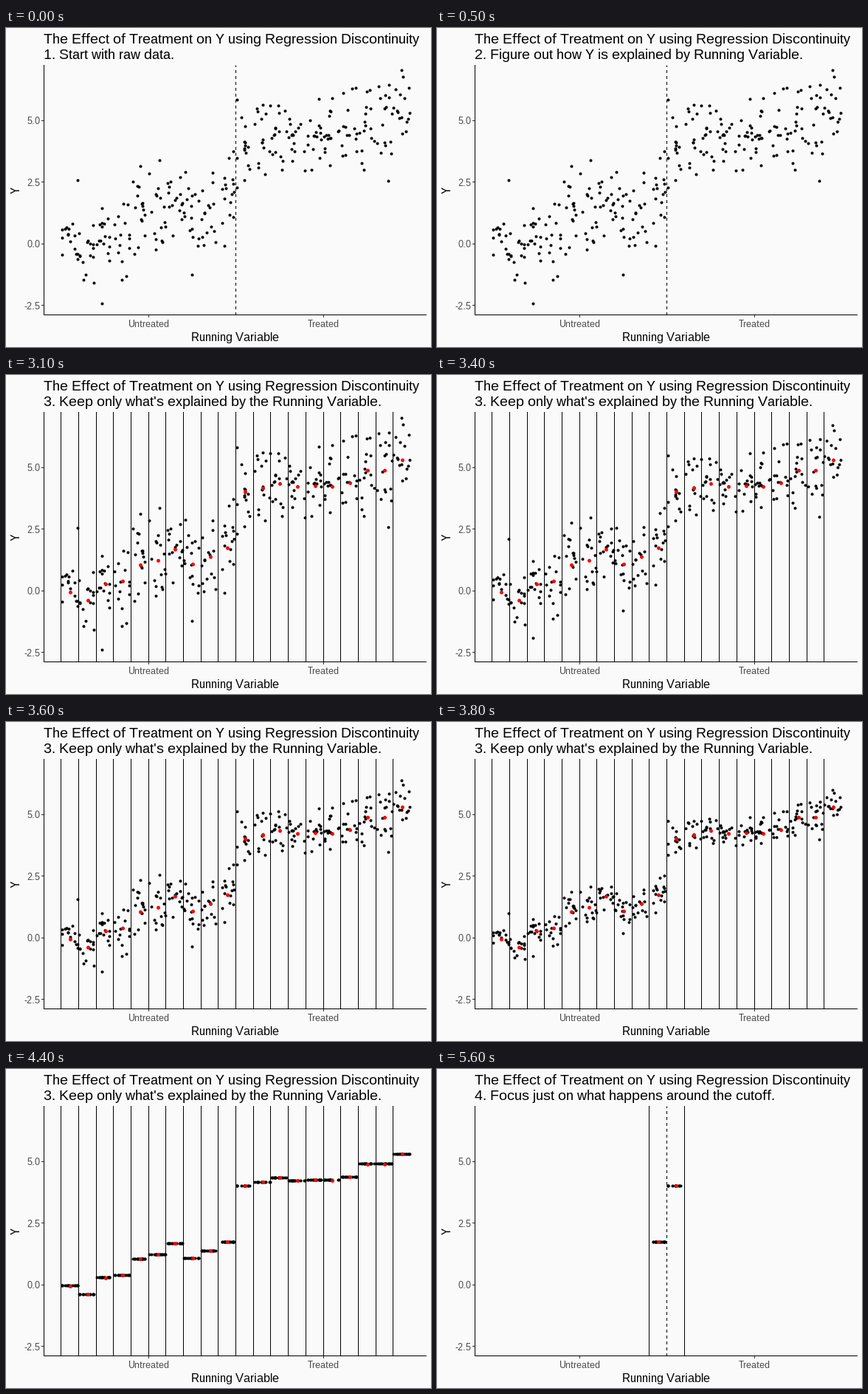
A matplotlib script for the animation above (8000 ms loop, 576 px wide and 432 px high).

```python
import numpy as np
import matplotlib.pyplot as plt
from matplotlib.animation import FuncAnimation

W, H, STEP, LOOP = 576, 432, 100, 8000
LEFT, RIGHT, TOP, BOTTOM = 51, 569, 50, 388
BIN_START, BIN_WIDTH, BINS, PER_BIN = 74.8, 23.68, 20, 15
CUTOFF = 311

# Whole-pixel glyph advances, no kerning
plt.rcParams.update({
    "font.family": "Liberation Sans",
    "text.hinting": "default",
    "text.hinting_factor": 1,
    "text.kerning_factor": 6,
})

HEADING = "The Effect of Treatment on Y using Regression Discontinuity"
RAW = "1. Start with raw data."
EXPLAIN = "2. Figure out how Y is explained by Running Variable."
KEEP = "3. Keep only what's explained by the Running Variable."
FOCUS = "4. Focus just on what happens around the cutoff."

BIN_MEANS = np.array([
    -0.03, -0.38, 0.30, 0.40, 1.06, 1.24, 1.69, 1.09, 1.39, 1.75,
    4.03, 4.18, 4.36, 4.24, 4.27, 4.26, 4.39, 4.92, 4.92, 5.32])

# A few outliers in pixels; the rest of the cloud is random.
OUTLIERS = [(97, 206), (130, 373), (182, 187), (208, 179),
            (252, 334), (308, 167), (518, 207), (538, 66)]


def y_pixel(value):
    return 292.2 - 33.36 * value


def make_points():
    rng = np.random.default_rng(5)
    k = np.repeat(np.arange(BINS), PER_BIN)
    x = BIN_START + BIN_WIDTH * (k + rng.uniform(0.02, 0.95, k.size))
    reach = np.minimum(68, 32 + 14 * k)
    y = y_pixel(BIN_MEANS[k]) + reach * rng.triangular(-1, 0, 1, k.size)
    return np.vstack([np.column_stack([x, y]), OUTLIERS]).T


px, py = make_points()
point_bins = ((px - BIN_START) // BIN_WIDTH).astype(int)
point_means = y_pixel(BIN_MEANS)[point_bins]
near_cutoff = (point_bins == 9) | (point_bins == 10)

fig = plt.figure(figsize=(W / 72, H / 72), dpi=72, facecolor="#FAFAFA")
ax = fig.add_axes([0, 0, 1, 1])
ax.set(xlim=(0, W), ylim=(H, 0))
ax.axis("off")


def line(xs, ys, color="black", **style):
    return ax.plot(xs, ys, color=color, lw=1,
                   solid_capstyle="projecting", **style)[0]


def text(x, y, label, size, color="black", **style):
    return ax.text(x, y, label, fontsize=size, color=color,
                   va="baseline", **style)


def spots(diameter, color, zorder):
    return ax.scatter([], [], s=diameter ** 2, color=color, lw=0,
                      antialiased=False, zorder=zorder)


# Axes, ticks and labels
line([LEFT, LEFT], [TOP, BOTTOM])
line([LEFT, RIGHT], [BOTTOM, BOTTOM])
for value in (-2.5, 0, 2.5, 5):
    y = y_pixel(value)
    line([LEFT - 3, LEFT - 1], [int(y), int(y)], "#333333")
    text(46.5, y + 5, f"{value:.1f}", 13, "#4D4D4D", ha="right")
for x, label in ((193, "Untreated"), (430, "Treated")):
    line([x, x], [BOTTOM + 1, BOTTOM + 3], "#333333")
    text(x, 405, label, 13, "#4D4D4D", ha="center")
text(310, 424, "Running Variable", 16, ha="center")
text(19, 219.5, "Y", 16, ha="center", rotation=90, rotation_mode="anchor")
text(51, 21, HEADING, 19)
subtitle = text(51, 42, RAW, 19)

# Moving parts
cutoff_line = line([CUTOFF, CUTOFF], [BOTTOM, TOP], ls=(0.5, (4, 4)))
edges = []
for k in range(BINS):
    x = int(BIN_START + BIN_WIDTH * k)
    edges.append(line([x, x], [BOTTOM, TOP]))
dots = spots(4, "black", 3)
means = spots(5, "red", 4)
centers = BIN_START + BIN_WIDTH * (np.arange(BINS) + 0.5)
mean_spots = np.floor(np.column_stack([centers, y_pixel(BIN_MEANS)])) + 0.5


def draw(frame):
    ms = frame * STEP
    binned = 1000 <= ms < 5600
    focused = ms >= 5600

    subtitle.set_text(RAW if ms < 500 else EXPLAIN if ms < 3100
                      else FOCUS if focused else KEEP)
    cutoff_line.set_visible(not binned)
    for k, edge in enumerate(edges):
        edge.set_visible(binned or (focused and k in (9, 11)))

    # Residuals shrink to the bin means with sine easing.
    t = np.clip((ms - 3000) / 1400, 0, 1)
    remaining = 0.5 + 0.5 * np.cos(np.pi * t)
    y = point_means + (py - point_means) * remaining
    shown = near_cutoff if focused else slice(None)
    dots.set_offsets(np.round(np.column_stack([px, y])[shown]))

    means.set_visible(binned or focused)
    means.set_offsets(mean_spots[9:11] if focused else mean_spots)
    return [subtitle, cutoff_line, dots, means, *edges]


anim = FuncAnimation(fig, draw, frames=LOOP // STEP, interval=STEP,
                     repeat=True, repeat_delay=0)
plt.show()
```
